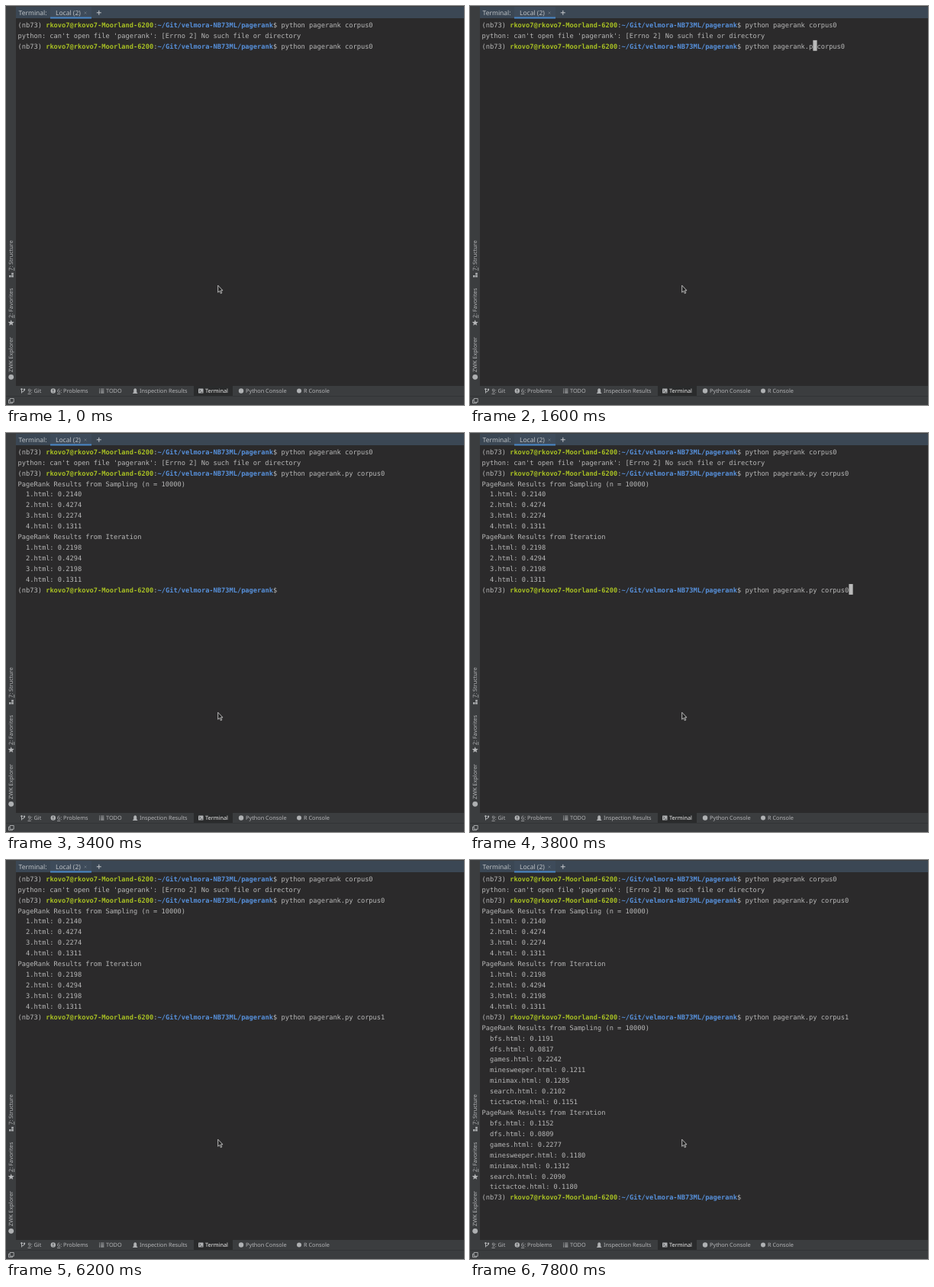
Recreate the animation shown at these times as an HTML page. Size 600 by 523 pixels, loop 8 s.

```html
<!DOCTYPE html>
<html lang="en">
<head>
<meta charset="utf-8">
<title>Terminal session</title>
<style>
html, body { margin: 0; width: 100%; height: 100%; overflow: hidden; background: #2b2a2b; }
svg { display: block; }
text { white-space: pre; text-rendering: geometricPrecision; }
.ui { font: 7.3px "Noto Sans", "Open Sans", sans-serif; fill: #b4b5b7; }
.head { font-size: 8.5px; fill: #bdc1c5; }
.key { text-decoration: underline; }
#term { font: 8.68px "DejaVu Sans Mono", "Noto Sans Mono", monospace; fill: #b8b8b8; }
#term .user { fill: #a8c023; font-weight: 700; }
#term .path { fill: #5791dc; font-weight: 700; }
</style>
</head>
<body>
<svg width="600" height="523" viewBox="0 0 600 523">
  <rect width="600" height="523" fill="#3b3d3f"/>
  <rect x="13" y="1" width="587" height="15" fill="#3b4754"/>
  <rect x="58" y="1" width="54" height="14" fill="#3e4b5a"/>
  <rect x="13" y="16" width="587" height="482" fill="#2b2a2b"/>
  <rect x="58" y="14.5" width="54" height="2" fill="#4a88c7"/>
  <rect y="511" width="600" height="1" fill="#323436"/>

  <g class="ui">
    <text class="head" x="16.5" y="11.5">Terminal:</text>
    <text class="head" x="65" y="11.5">Local (2)</text>
    <path d="M102.5 7.5l3 3m0-3l-3 3" stroke="#6f7a85" stroke-width=".7"/>
    <path d="M118.8 8.8h6M121.8 5.8v6" stroke="#c3c7ca" stroke-width="1"/>

    <text transform="translate(9.4 347) rotate(-90)"><tspan class="key">7</tspan>: Structure</text>
    <text transform="translate(9.4 409) rotate(-90)"><tspan class="key">2</tspan>: Favorites</text>
    <text transform="translate(9.4 480) rotate(-90)">ZWK Explorer</text>
    <path d="M4 353h2.6v2.6h-2.6zM7.2 353h2.6v2.6h-2.6zM7.2 349.8h2.6v2.6h-2.6z" fill="#aeb0b2"/>
    <path d="M6.7 411.2l1.1 2.7 2.9.2-2.2 1.9.7 2.8-2.5-1.5-2.5 1.5.7-2.8-2.2-1.9 2.9-.2z" fill="#b4b5b7"/>
    <circle cx="6.7" cy="486.3" r="3.4" fill="#aeb0b2"/>

    <rect x="246" y="498" width="51" height="13" fill="#2a2b2c"/>
    <g fill="none" stroke="#afb1b3">
      <path d="M20.5 502v5.5M24 503v1q0 1.5-3.5 2" stroke-width="1"/>
      <path d="M122 502.3h1.2m1 0h4.2M122 504.6h1.2m1 0h4.2M122 506.9h1.2m1 0h4.2" stroke-width="1.1"/>
      <path d="M5.2 514.5h5v4.8h-5zM5 516.3h-1.5v4.4h5v-1.3" stroke-width=".9"/>
    </g>
    <g fill="#afb1b3">
      <circle cx="20.5" cy="502.3" r="1.2"/><circle cx="24" cy="502.7" r="1.2"/>
      <circle cx="61.8" cy="504.5" r="3.2"/>
      <path d="M166.2 508v-1.3h1v-2.7q0-2.8 2-2.8t2 2.8v2.7h1v1.3z"/>
      <rect x="252" y="501.4" width="6.5" height="6.2" rx=".5"/>
      <circle cx="308" cy="504.5" r="3.2"/>
      <circle cx="384" cy="504.5" r="3"/>
    </g>
    <path d="M61.8 502.4v2.6m0 .7v1" stroke="#3b3d3f" stroke-width="1"/>
    <path d="M253.2 502.8l1.5 1.5-1.5 1.5M255.4 506.2h2" fill="none" stroke="#2a2b2c" stroke-width=".8"/>
    <text x="28.5" y="507.2"><tspan class="key">9</tspan>: Git</text>
    <text x="67" y="507.2"><tspan class="key">6</tspan>: Problems</text>
    <text x="131" y="507.2">TODO</text>
    <text x="175" y="507.2">Inspection Results</text>
    <text x="261" y="507.2" fill="#eeeeee">Terminal</text>
    <text x="314" y="507.2">Python Console</text>
    <text x="390" y="507.2">R Console</text>
  </g>

  <g id="term"></g>
  <path d="M277.7 366.2v9.2l2.1-1.9 1.5 3.3 1.5-.7-1.5-3.2h2.7z" fill="#222" stroke="#ddd" stroke-width=".8"/>
</svg>
<script>
const LOOP = 8000, X0 = 15.6, TOP = 17, CW = 5.226, LH = 13.92;
const term = document.getElementById("term");
const ENV = "(nb73) ", USER = "rkovo7@rkovo7-Moorland-6200", DIR = "~/Git/velmora-NB73ML/pagerank";
const CMD = (ENV + USER + ":" + DIR + "$ ").length;
const colX = c => X0 + c * CW;
const baseline = row => TOP + row * LH + 10.8;

function add(tag, attrs, parent, text = "") {
  const el = document.createElementNS("http://www.w3.org/2000/svg", tag);
  for (const k in attrs) el.setAttribute(k, attrs[k]);
  el.textContent = text;
  return parent.appendChild(el);
}

function line(row, ...parts) {
  const el = add("text", { y: baseline(row) }, term);
  let col = 0;
  for (const [text, cls] of parts) {
    add("tspan", { x: colX(col), class: cls || "" }, el, text);
    col += text.length;
  }
}

const prompt = (row, cmd) =>
  line(row, [ENV], [USER, "user"], [":"], [DIR, "path"], ["$ " + cmd]);

function results(row, names, ...runs) {
  const titles = ["Sampling (n = 10000)", "Iteration"];
  runs.forEach((run, i) => {
    line(row++, ["PageRank Results from " + titles[i]]);
    run.forEach((v, j) => line(row++, [`  ${names[j]}.html: ${v.toFixed(4)}`]));
  });
}

// Latest entry whose start time has passed
const pick = (list, t) => list.filter(e => e[0] <= t).pop();

const edited = [[0, "python pagerank corpus0"], [1200, "python pagerank. corpus0"],
  [1600, "python pagerank.p corpus0"], [1800, "python pagerank.py corpus0"]];
const recalled = [[2200, ""], [3700, "python pagerank.py corpus0"],
  [4800, "python pagerank.py corpus"], [5700, "python pagerank.py corpus1"]];

// time, row, column after the prompt (no row: hidden)
const caret = [[0], [100, 2, 21], [200, 2, 19], [300, 2, 17], [500, 2, 16], [900],
  [1100, 2, 15], [1200, 2, 16], [1600, 2, 17], [1800, 2, 18], [2100, 3, -CMD],
  [2200, 13, 0], [3400], [3700, 13, 26], [4500], [4800, 13, 25], [5700, 13, 26],
  [6200], [6400, 14, -CMD], [6500, 30, -CMD], [6600, 30, 0], [7800]];

function draw(t) {
  term.textContent = "";
  const cmds = { 2: pick(edited, t)[1] };
  prompt(0, "python pagerank corpus0");
  line(1, ["python: can't open file 'pagerank': [Errno 2] No such file or directory"]);
  prompt(2, cmds[2]);
  if (t >= 2200) {
    results(3, [1, 2, 3, 4], [.2140, .4274, .2274, .1311], [.2198, .4294, .2198, .1311]);
    cmds[13] = pick(recalled, t)[1];
    prompt(13, cmds[13]);
  }
  if (t >= 6500) {
    results(14, ["bfs", "dfs", "games", "minesweeper", "minimax", "search", "tictactoe"],
      [.1191, .0817, .2242, .1211, .1285, .2102, .1151],
      [.1152, .0809, .2277, .1180, .1312, .2090, .1180]);
  }
  if (t >= 6600) prompt(30, "");

  const [, row, col] = pick(caret, t);
  if (row === undefined) return;
  const x = colX(CMD + col);
  add("rect", { x, y: TOP + row * LH, width: CW, height: LH, fill: "#bbbbbb" }, term);
  const under = (cmds[row] || "")[col];
  if (under) add("text", { x, y: baseline(row), fill: "#2b2a2b" }, term, under);
}

const marks = [...edited, ...recalled, ...caret].map(e => e[0]);
let shown = -1;
function frame(now) {
  const t = now % LOOP;
  const mark = Math.max(...marks.filter(m => m <= t));
  if (mark !== shown) draw(shown = mark);
  requestAnimationFrame(frame);
}
frame(performance.now());
</script>
</body>
</html>
```
